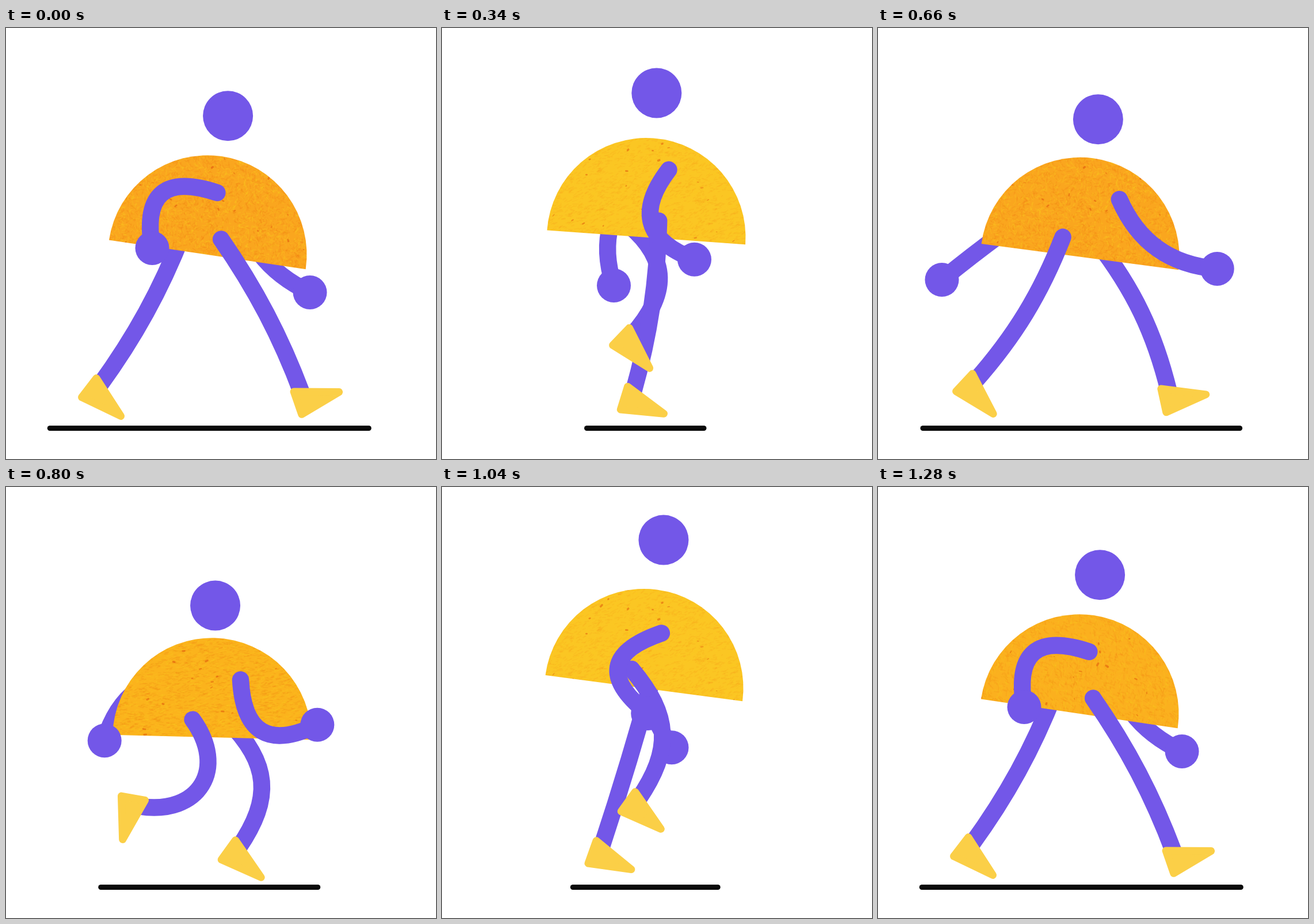
An HTML page with a canvas that plays this animation: 747x749 px, repeating every 1.3 s.

```html
<!DOCTYPE html>
<html lang="en">
<head>
<meta charset="utf-8">
<title>Walk cycle</title>
<style>
html, body { margin: 0; width: 100%; height: 100%; overflow: hidden; background: #fff; }
canvas { display: block; }
</style>
</head>
<body>
<canvas id="stage" width="747" height="749"></canvas>
<script>
const ctx = document.getElementById('stage').getContext('2d');
const LOOP = 1300, CYCLE = 1280, STRIDE = CYCLE / 2, TICK = 20;
const PURPLE = '#7357e8', SHOE = '#fbcf47', INK = '#0a0a0a';
const LEG = 322, ARM = 271, LEG_HANDLE = 105;
const { PI, sin, cos, hypot, sqrt, max, floor } = Math;
const rad = deg => deg * PI / 180;

// Ankle positions at the key moments of the walk
const keyTimes = [0, 160, 340, 500, 635, 800, 1040];
const nearAnkle = [[514, 635], [515, 635], [332, 634], [255, 627], [165, 620], [232, 555], [341, 543]];
const farAnkle = [[162, 622], [165, 621], [329, 535], [426, 579], [510, 632], [404, 627], [277, 626]];

// Periodic monotone cubic through the keys on one axis
function spline(keys, axis, t) {
  const n = keys.length;
  const time = i => keyTimes[(i + n) % n] + floor(i / n) * CYCLE;
  const value = i => keys[(i + n) % n][axis];
  const slope = i => (value(i + 1) - value(i)) / (time(i + 1) - time(i));
  const tangent = i => {
    const a = slope(i - 1), b = slope(i);
    return a * b <= 0 ? 0 : 2 * a * b / (a + b);
  };
  let i = n - 1;
  while (keyTimes[i] > t) i--;
  const h = time(i + 1) - time(i), u = (t - time(i)) / h, v = 1 - u;
  return value(i) * v * v * (1 + 2 * u) + value(i + 1) * u * u * (3 - 2 * u)
    + h * u * v * (tangent(i) * v - tangent(i + 1) * u);
}

// Body height from 0 to 1, once per step, rising faster than it falls
function lift(t) {
  const u = (t - 160 + CYCLE) % STRIDE / STRIDE, peak = 0.46;
  const half = u < peak ? u / peak : 1 + (u - peak) / (1 - peak);
  return (1 - cos(PI * half)) / 2;
}

function disc([x, y], r) {
  ctx.fillStyle = PURPLE;
  ctx.beginPath();
  ctx.arc(x, y, r, 0, 2 * PI);
  ctx.fill();
}

// Rubber limb: the closer its ends, the further it bows to one side.
// Returns the direction of its far end.
function hose([x0, y0], [x1, y1], length, side, handle) {
  const dx = x1 - x0, dy = y1 - y0, d = hypot(dx, dy);
  const bow = side * max(0, length - d) * 2 / 3 / d;
  const along = handle ? sqrt(max(0, handle ** 2 - (bow * d) ** 2)) / d : 1 / 3;
  const outX = -dy * bow, outY = dx * bow;
  const endX = dx * along - outX, endY = dy * along - outY;
  ctx.strokeStyle = PURPLE;
  ctx.lineWidth = 29.5;
  ctx.lineCap = 'round';
  ctx.beginPath();
  ctx.moveTo(x0, y0);
  ctx.bezierCurveTo(x0 + dx * along + outX, y0 + dy * along + outY, x1 - endX, y1 - endY, x1, y1);
  ctx.stroke();
  return Math.atan2(endY, endX);
}

function shoe([x, y], angle) {
  ctx.save();
  ctx.translate(x, y);
  ctx.rotate(angle - rad(69));
  ctx.fillStyle = ctx.strokeStyle = SHOE;
  ctx.lineWidth = 13;
  ctx.lineJoin = 'round';
  ctx.beginPath();
  ctx.moveTo(-14, -3);
  ctx.lineTo(0, 36.3);
  ctx.lineTo(64.5, -3);
  ctx.closePath();
  ctx.fill();
  ctx.stroke();
  ctx.restore();
}

// Grainy paper: short soft fibres and a few burnt specks
function paper(seed, base, grain, angle, spread) {
  const random = () => (seed = seed * 16807 % 2147483647) / 2147483647;
  const sheet = document.createElement('canvas');
  sheet.width = 747;
  sheet.height = 480;
  const c = sheet.getContext('2d');
  c.fillStyle = base;
  c.fillRect(0, 0, 747, 480);
  c.lineCap = 'round';
  const fibre = (color, width, length) => {
    const x = 165 + random() * 380, y = 140 + random() * 320;
    const a = rad(angle + (random() - 0.5) * spread);
    c.strokeStyle = color;
    c.lineWidth = width;
    c.beginPath();
    c.moveTo(x, y);
    c.lineTo(x + cos(a) * length, y + sin(a) * length);
    c.stroke();
  };
  for (let i = 0; i < 7000; i++) {
    const tone = i % 2 ? `rgba(240,125,20,${grain})` : `rgba(252,205,35,${grain * 1.2})`;
    fibre(tone, 1 + random() * 1.5, 2 + random() * 6);
  }
  for (let i = 0; i < 45; i++) fibre('rgba(220,75,10,.5)', 1 + random() * 2.5, 1 + random() * 3);
  return sheet;
}

const papers = [
  paper(11, '#faa61e', 0.2, 80, 180),
  paper(23, '#fbb31c', 0.17, -8, 50),
  paper(37, '#fbc623', 0.09, -20, 60),
  paper(53, '#fbb01e', 0.15, 60, 120)
];

function draw(time) {
  const t = time % CYCLE, phase = 2 * PI * t / CYCLE;
  const c = cos(phase), s = sin(phase);

  const rise = lift(t), stepHeight = t >= 160 && t < 160 + STRIDE ? 106 : 93;
  const lean = 0.5 + 10.9 * lift(t - 65), tilt = rad(lean);
  const cx = 359.5 - 1.15 * lean, cy = 435 - stepHeight * rise;
  const onBody = (x, y) => [
    cx + x * cos(tilt) - y * sin(tilt),
    cy + x * sin(tilt) + y * cos(tilt)
  ];

  const hipPhase = phase - rad(48);
  const swing = 1.18 * cos(hipPhase) - 0.18 * cos(3 * hipPhase);
  const near = {
    hip: onBody(-6.5 + 28 * swing, -30),
    ankle: [0, 1].map(axis => spline(nearAnkle, axis, t)),
    shoulder: onBody(28 - 27 * c, -109 - 11 * s),
    hand: [422 - 168 * c, 400.5 - 18 * c]
  };
  const far = {
    hip: onBody(-12 - 38 * swing, -30),
    ankle: [0, 1].map(axis => spline(farAnkle, axis, t)),
    shoulder: onBody(-5 + 37 * c, -111),
    hand: [319 + 209 * c, 448.5 + 11 * c]
  };
  const arm = side => hose(side.shoulder, side.hand, ARM, 1);
  const leg = side => hose(side.hip, side.ankle, LEG, -1, LEG_HANDLE);

  ctx.fillStyle = '#fff';
  ctx.fillRect(0, 0, 747, 749);

  const half = 193 + 88.5 * cos(2 * phase);
  ctx.fillStyle = INK;
  ctx.beginPath();
  ctx.roundRect(353.25 - half, 691, half * 2, 9, 4.5);
  ctx.fill();

  arm(far);
  const farFoot = leg(far);

  ctx.save();
  ctx.beginPath();
  ctx.arc(cx, cy, 172.7, tilt + PI, tilt + 2 * PI);
  ctx.closePath();
  ctx.clip();
  ctx.drawImage(papers[floor((time + 105) / 175) % papers.length], 0, 0);
  ctx.restore();

  disc(onBody(0, -229 - 33.5 * rise), 43.5);
  disc(far.hand, 29.5);
  const nearFoot = leg(near);
  arm(near);
  disc(near.hand, 29.5);
  shoe(far.ankle, farFoot);
  shoe(near.ankle, nearFoot);
}

const start = performance.now();
function tick() {
  const t = (performance.now() - start) % LOOP;
  draw(floor(t / TICK) * TICK);
  requestAnimationFrame(tick);
}
tick();
</script>
</body>
</html>
```
